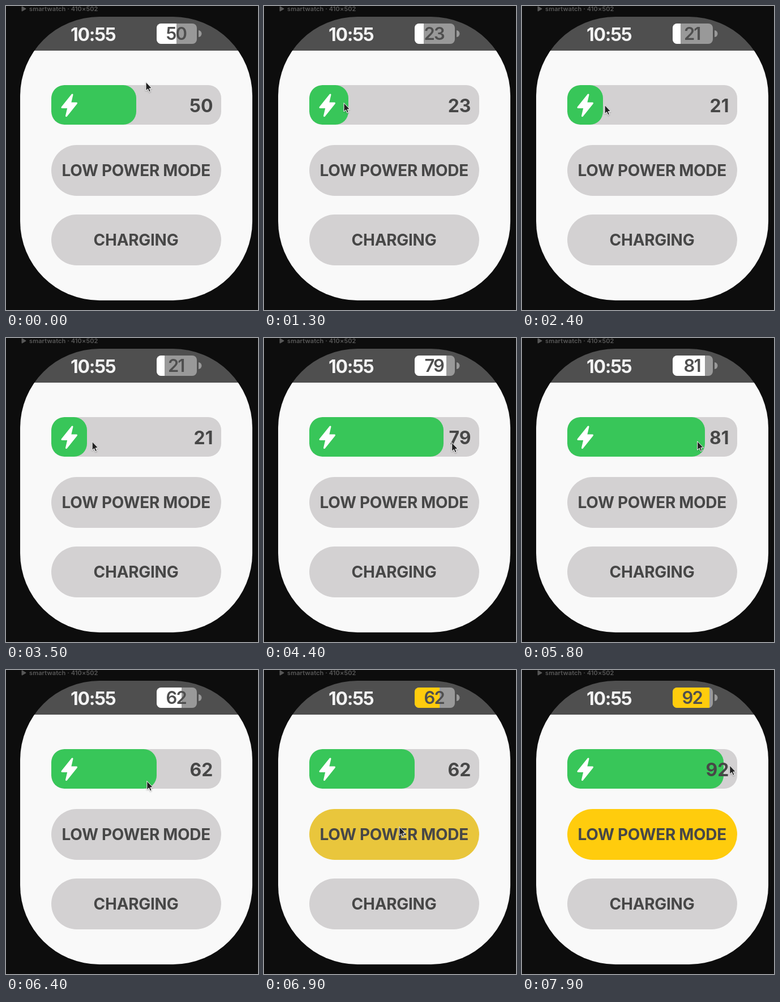
Write an HTML page that moves like this. It is 445 by 538 pixels and loops after 8000 ms.

```html
<!DOCTYPE html>
<html lang="en">
<head>
<meta charset="utf-8">
<title>Battery control</title>
<style>
  html, body { margin: 0; width: 100%; height: 100%; overflow: hidden; background: #0d0d0d; }
  svg { display: block; width: 100vw; height: 100vh; }
  text { font-family: Inter, "Liberation Sans", sans-serif; font-weight: 700; fill: #474747; }
  .label { font-size: 11px; font-weight: 600; letter-spacing: .1px; fill: #585858; }
  .clock { font-size: 32px; letter-spacing: -1.3px; fill: #f2f2f2; }
  .level { font-size: 32px; text-anchor: end; }
  .small { font-size: 31px; font-weight: 600; letter-spacing: -1.9px; text-anchor: middle; fill: #4f4f4f; }
  .button { font-size: 28px; letter-spacing: -.3px; text-anchor: middle; }
  #power { transform-origin: 230px 291px; }
</style>
</head>
<body>
<svg viewBox="0 0 445 538">
  <defs>
    <clipPath id="screen"><rect x="25" y="19" width="410" height="502" rx="140"/></clipPath>
    <clipPath id="cell"><rect x="266" y="31" width="71" height="36" rx="8"/></clipPath>
    <clipPath id="track"><rect x="80" y="140" width="300" height="70" rx="23"/></clipPath>
    <filter id="shade" x="-50%" y="-50%" width="200%" height="200%">
      <feDropShadow dx="0" dy="1" stdDeviation="1" flood-opacity=".35"/>
    </filter>
  </defs>

  <path d="M28.5 1.5V8.5L34.5 5Z" fill="#585858" stroke="#585858" stroke-width="2" stroke-linejoin="round"/>
  <text class="label" x="41" y="9">smartwatch · 410×502</text>

  <g clip-path="url(#screen)">
    <rect x="25" y="79" width="410" height="442" fill="#f9f9f9"/>
    <rect x="25" y="19" width="410" height="60" fill="#4f4f4f"/>
  </g>
  <text class="clock" x="114" y="62">10:55</text>

  <g clip-path="url(#cell)">
    <rect x="266" y="31" width="71" height="36" fill="#999"/>
    <rect id="charge" x="266" y="31" height="36"/>
  </g>
  <path d="M340 43A5.5 6 0 0 1 340 55Z" fill="#999"/>
  <text class="small" id="smallNum" x="300.2" y="60"></text>

  <g clip-path="url(#track)">
    <rect x="80" y="140" width="300" height="70" fill="#d3d1d2"/>
    <rect id="fill" x="80" y="140" height="70" fill="#38c659"/>
  </g>
  <path d="M117 157L99 179.5H110L106.5 194.5L124.5 172H113.5Z" fill="#fff" stroke="#fff" stroke-width="3" stroke-linejoin="round"/>
  <text class="level" id="levelNum" x="365.5" y="188"></text>

  <g id="power">
    <rect id="powerBack" x="80" y="246" width="300" height="90" rx="45"/>
    <text class="button" x="229.8" y="301">LOW POWER MODE</text>
  </g>
  <rect x="80" y="369" width="300" height="90" rx="45" fill="#d3d1d2"/>
  <text class="button" x="229.5" y="424">CHARGING</text>

  <path id="cursor" d="M0 .5V16L3.6 12.8L5.8 18.2L8.4 17.1L6.2 11.8H10.8Z" fill="#222" stroke="#fff" stroke-linejoin="round" filter="url(#shade)"/>
</svg>
<script>
  const LOOP = 8000, STEP = 100;
  const GRAB = 500, RELEASE = 6180, REGRAB = 7450, LAG = 70;
  const SAVE_FROM = 6800;

  // Turning points of the pointer: time, x, y.
  const pointer = [
    [0, 247, 134], [400, 211, 174], [GRAB, 211, 174], [1300, 141, 171], [1750, 84, 173],
    [2450, 147, 175], [3200, 132, 182], [4980, 398, 185], [5080, 398, 185], [6250, 255, 181],
    [6850, 239, 277], [6950, 239, 277], [REGRAB, 282, 178], [LOOP, 373, 168]
  ];
  // Button colour: time, red, green, blue.
  const tint = [[6600, 211, 209, 210], [6900, 233, 198, 60], [7200, 255, 204, 13]];

  const el = id => document.getElementById(id);
  const [charge, fill, smallNum, levelNum, power, powerBack, cursor] =
    ["charge", "fill", "smallNum", "levelNum", "power", "powerBack", "cursor"].map(el);
  const clamp = (v, lo, hi) => Math.min(hi, Math.max(lo, v));

  // Tangent at key i: level at the ends and turns, harmonic mean elsewhere.
  function tangent(keys, i, n) {
    if (i === 0 || i === keys.length - 1) return 0;
    const rate = j => (keys[j + 1][n] - keys[j][n]) / (keys[j + 1][0] - keys[j][0]);
    const a = rate(i - 1), b = rate(i);
    return a * b > 0 ? 2 * a * b / (a + b) : 0;
  }

  // Smooth curve through the keys that never overshoots them.
  function sample(keys, time) {
    const t = clamp(time, keys[0][0], keys[keys.length - 1][0]);
    const i = Math.max(1, keys.findIndex(k => k[0] >= t));
    const a = keys[i - 1], b = keys[i];
    const h = b[0] - a[0], p = (t - a[0]) / h, q = 1 - p;
    return a.slice(1).map((v, j) => {
      const n = j + 1;
      return v + (b[n] - v) * p * p * (3 - 2 * p)
        + h * p * q * (q * tangent(keys, i - 1, n) - p * tangent(keys, i, n));
    });
  }

  // The bar trails the pointer while it is held.
  function levelAt(t) {
    if (t <= GRAB) return 50;
    const held = t < REGRAB ? Math.min(t, RELEASE) : t;
    const [x] = sample(pointer, held - LAG);
    return clamp(Math.round((x - 80) / 3), 0, 100);
  }

  function draw(t) {
    const value = levelAt(t), width = value * 3;
    fill.setAttribute("width", width);
    fill.setAttribute("rx", Math.min(23, width / 2));
    charge.setAttribute("width", Math.floor(value * .71));
    charge.setAttribute("fill", t >= SAVE_FROM ? "#ffcc0d" : "#fff");
    smallNum.textContent = levelNum.textContent = value;
    powerBack.setAttribute("fill", `rgb(${sample(tint, t).map(Math.round)})`);
    const hover = Math.sin(Math.PI * clamp((t - 6400) / 500, 0, 1));
    power.style.transform = `scale(${1 + .014 * hover})`;
    cursor.setAttribute("transform", `translate(${sample(pointer, t)})`);
  }

  const start = performance.now();
  function tick() {
    const t = (performance.now() - start) % LOOP;
    draw(Math.floor(t / STEP) * STEP);
    requestAnimationFrame(tick);
  }
  tick();
</script>
</body>
</html>
```
